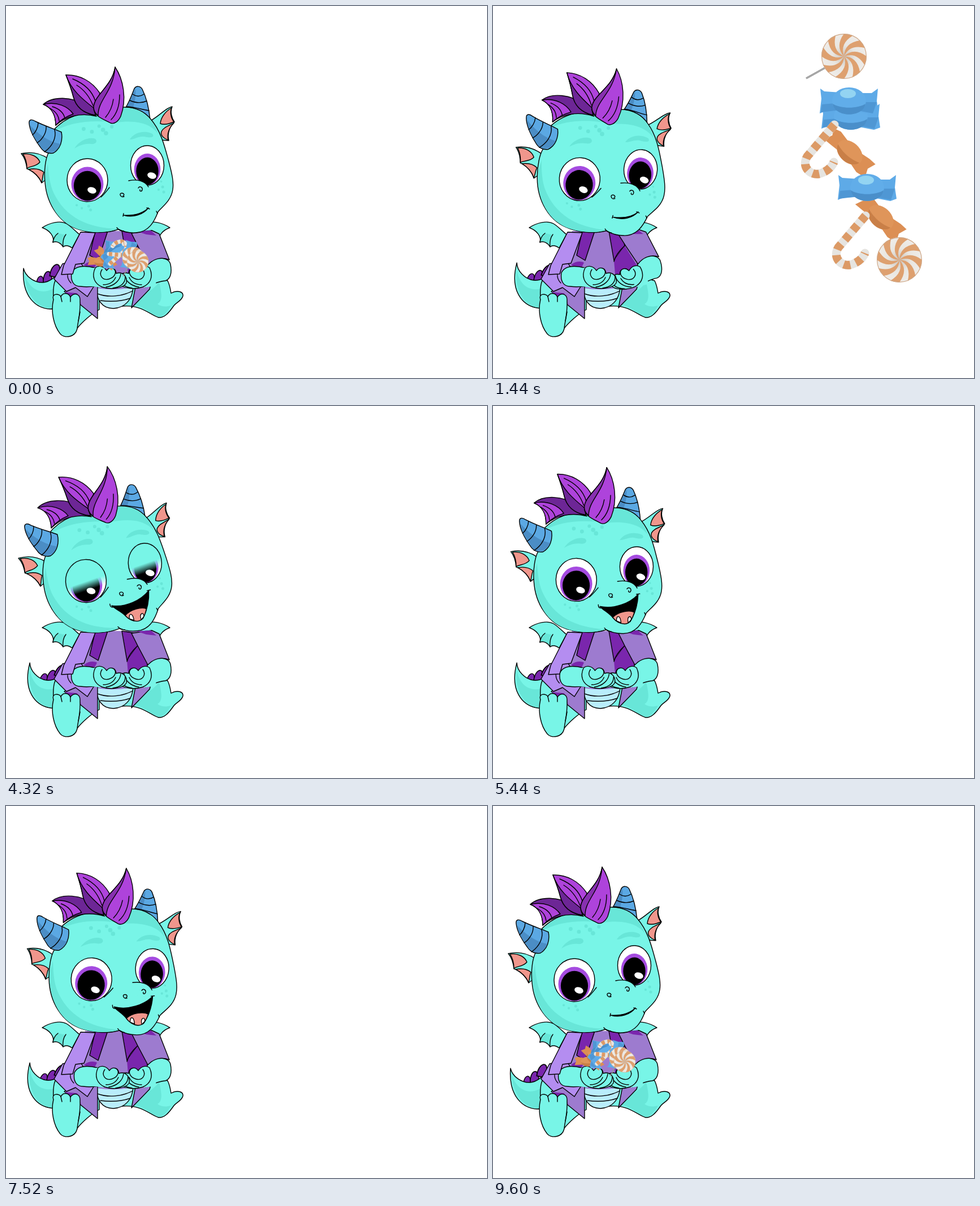
Animation, 851 px wide and 658 px high, one loop 9760 ms. Source, as an HTML page:

```html
<!DOCTYPE html>
<html lang="en">
<head>
<meta charset="utf-8">
<title>Little dragon</title>
<style>
html, body { margin: 0; width: 100%; height: 100%; overflow: hidden; background: #fff; }
svg { display: block; width: 851px; height: 658px; }
#dragon { stroke: #000; stroke-width: 1.4; stroke-linejoin: round; stroke-linecap: round; }
.skin { fill: #78f5e7; }
.shade { fill: #68e6d8; stroke: none; }
.line { fill: none; }
.bare { stroke: none; }
.horn { fill: #5ba8e3; }
.hornDark { fill: #4b8dc5; stroke: none; }
.pink { fill: #f0968c; }
.hair { fill: #ae43db; }
.hairMid { fill: #8730b0; }
.hairDark { fill: #6d2696; }
.vest { fill: #9d7bcf; }
.vestLight { fill: #b48df0; }
.vestDark { fill: #7a26ad; }
.belly { fill: #b9edfb; }
.white { fill: #fff; }
</style>
</head>
<body>
<svg viewBox="0 0 851 658">
<defs>
  <linearGradient id="lidFade" x1="0" y1="0" x2="0" y2="1">
    <stop offset=".84" stop-color="#78f5e7"/>
    <stop offset="1" stop-color="#78f5e7" stop-opacity="0"/>
  </linearGradient>
  <radialGradient id="sugar">
    <stop stop-color="#c9c2ba"/>
    <stop offset=".5" stop-color="#e9e6e1"/>
    <stop offset="1" stop-color="#efece8"/>
  </radialGradient>
  <g id="lolly">
    <circle r="40" fill="url(#sugar)"/>
    <g id="swirl" fill="#dea06f"></g>
    <circle r="39.4" fill="none" stroke="#cfa888" stroke-width="1.2"/>
  </g>
  <g id="stickLolly">
    <path d="M-33 20L-67 39" stroke="#777" stroke-width="3"/>
    <path d="M-33 20L-67 39" stroke="#ddd"/>
    <use href="#lolly"/>
  </g>
  <g id="blue">
    <path d="M0-14L-44-17L-51-22L-49-4L-52 22L-42 18L0 16L41 24L52 20L49 0L51-22L40-14Z" fill="#5eaae7"/>
    <path d="M0 2L-48 6L-50 20L0 14L42 22L49 2Z" fill="#4f97d4"/>
    <ellipse rx="30" ry="24" fill="#61ade9"/>
    <path d="M-29 5C-15 14 15 14 29 5C25 30-25 30-29 5Z" fill="#4a8fca"/>
    <ellipse cx="-2" cy="-13" rx="14" ry="8" fill="#93d4f2"/>
  </g>
  <g id="orange">
    <path d="M0-10L-36-17L-50-13L-43-2L-49 13L-31 12L0 10L32 18L50 15L43 0L48-15L34-15Z" fill="#dc8f54"/>
    <ellipse rx="26" ry="18" fill="#df955a"/>
    <path d="M-25 3C-8 9 10 8 25 2C21 22-19 23-25 3Z" fill="#c97f47"/>
  </g>
  <g id="cane" fill="none" stroke-width="15">
    <path id="hook" d="M28-48L-20 8C-32 28-12 44 4 38C16 34 24 26 27 18" stroke="#e6e4e0" stroke-linecap="round"/>
    <path d="M28-48L-20 8C-32 28-12 44 4 38C16 34 24 26 27 18" stroke="#dc9a66" stroke-dasharray="12 10"/>
  </g>
  <path id="spike" d="M-6 9C-7-4-1-12 4-8C8-3 7 4 6 9Z"/>
  <g id="wing">
    <path class="skin" d="M64 392C78 383 96 379 107 385C117 391 124 400 130 404L117 428C110 423 105 423 101 426C98 420 90 415 83 418C86 408 78 397 64 392Z"/>
    <path class="shade" d="M84 416C85 409 88 405 93 402L105 405C101 412 101 418 101 424C97 418 91 415 84 416Z"/>
    <path class="line" d="M83 418C84 410 88 405 92 402M101 426C100 416 102 409 106 404"/>
  </g>
  <g id="hand">
    <path class="skin bare" d="M150 466L158 462L168 498L146 495Z"/>
    <path class="skin" d="M158 463C151 478 156 491 170 497C184 502 207 500 213 490C215 478 206 469 195 473C194 463 184 460 178 468C172 459 163 459 158 463"/>
    <path class="line" d="M170 466C163 476 171 486 182 483C192 480 196 472 192 466M203 474C202 485 192 495 177 497M211 479C211 490 203 497 189 499M194 480C190 489 183 493 172 493"/>
  </g>
</defs>

<g id="dragon">
  <g id="tail">
    <g class="vestDark">
      <use href="#spike" x="60" y="487"/>
      <use href="#spike" transform="translate(73 480) scale(1.15)"/>
      <use href="#spike" transform="translate(87 468) scale(1.25) rotate(12)"/>
    </g>
    <path class="skin" d="M31 464C34 478 50 490 66 489C80 488 92 474 104 462L104 530C95 534 85 536 78 536C55 535 27 516 31 464Z"/>
    <path class="shade" d="M33 476C42 500 60 512 84 500L90 534C60 540 36 515 33 476Z"/>
  </g>
  <use id="wingL" href="#wing"/>
  <g id="wingR"><use href="#wing" transform="translate(354 0) scale(-1 1)"/></g>
  <g id="legR">
    <path class="skin" d="M205 500C240 480 270 480 286 486C290 494 291 502 292 508C303 502 314 505 313 513C311 521 302 524 297 530C288 543 280 552 270 551C254 546 240 528 205 531Z"/>
    <path class="shade" d="M230 515C250 510 262 500 271 488C276 510 277 522 268 527C276 533 284 532 292 530C284 543 278 550 270 550C255 545 243 530 225 529Z"/>
  </g>

  <path class="skin" d="M87 486C82 498 84 510 84 520L126 570C134 560 150 545 165 537L165 500Z"/>
  <path class="belly" d="M160 498C160 520 170 535 190 535C210 534 224 520 225 496Z"/>
  <path class="line" d="M162 509C180 516 205 514 224 504M167 521C182 523 202 523 220 517"/>
  <path class="vest bare" d="M140 398L262 398L258 488C220 503 180 504 150 497L112 470Z"/>
  <path class="vestDark" d="M158 398L180 398L163 450L148 441ZM205 398L229 402L233 424L214 450Z"/>
  <path class="vestDark bare" d="M233 424L254 458L250 474L216 474L214 450Z"/>
  <path class="line" d="M233 424C222 434 216 443 214 452"/>
  <path class="vest" d="M229 497L258 487L254 501L222 534Z"/>
  <path class="vest" d="M103 505L130 490L162 496L162 553Z"/>
  <path class="vestDark bare" d="M104 506L126 508L133 528L118 516Z"/>
  <path class="vestLight" d="M100 456L85 483L107 505L123 498L144 514L156 495L130 450Z"/>
  <path class="vestDark bare" d="M138 458C146 451 156 451 161 454L154 468Z"/>
  <path class="skin" d="M84 519C80 508 94 508 97 514C101 506 111 507 114 515C119 506 132 508 131 522C132 545 127 558 126 571C122 587 103 588 96 580C84 565 79 540 84 519Z"/>
  <path class="line" d="M97 514L99 523M114 515L114 523M131 541L128 557"/>

  <g id="armR">
    <path class="skin" d="M250 455C263 442 288 443 291 457C294 472 291 483 282 486C269 487 262 491 246 497L250 467Z"/>
    <use href="#hand" transform="translate(412 0) scale(-1 1)"/>
    <path class="vest" d="M222 402L258 397L271 403L289 449C275 443 261 447 251 458L233 424Z"/>
    <path class="vestDark bare" d="M230 398L256 397L266 406L248 404Z"/>
  </g>
  <g id="armL">
    <path class="skin" d="M116 472C114 486 119 496 132 496C145 498 155 496 162 495L157 463C140 459 122 459 116 472Z"/>
    <use href="#hand"/>
    <path class="line" d="M115 490C108 483 108 475 110 470"/>
  </g>
  <path class="vestLight" d="M132 400L158 401L138 455L123 457L118 474L98 475L102 459Z"/>

  <g id="head">
    <path class="skin" d="M27 261C33 268 36 278 37 288C45 290 58 300 63 313C68 308 72 307 79 307L75 270C60 260 45 257 27 261Z"/>
    <path class="pink" d="M30 262C44 260 56 266 60 276C54 284 44 283 37 287C37 277 34 268 30 262ZM40 289C50 287 60 288 67 294C64 302 65 307 63 312C58 301 50 294 40 289Z"/>
    <path class="skin" d="M252 205C272 195 282 180 294 178C290 187 293 198 298 205C290 213 285 225 288 238L272 237Z"/>
    <path class="pink" d="M293 180C283 186 274 196 273 208C280 211 290 208 297 205C291 197 290 187 293 180ZM297 207C288 212 278 215 275 222C273 228 278 234 287 237C284 226 289 215 297 207Z"/>
    <path class="horn" d="M211 181C220 166 224 153 227 146C231 140 238 142 241 147C249 163 253 180 255 202C243 188 230 180 211 181Z"/>
    <path class="hornDark" d="M213 180C221 166 226 152 229 145C230 160 228 171 224 181Z"/>
    <path class="line" d="M224 156C231 161 238 160 244 156M219 167C230 172 240 172 249 168M214 178C230 179 243 184 253 185"/>
    <path class="skin" d="M82 222C110 188 150 187 185 182C215 175 240 180 256 200C275 222 281 250 288 275C294 298 297 312 295 325C292 345 276 355 269 364C263 380 253 400 230 401C215 402 205 398 199 395C180 402 155 402 135 397C95 388 72 350 69 312C67 290 70 270 75 260C73 245 76 230 82 222Z"/>
    <path class="shade" d="M70 300C70 350 95 388 135 397C155 402 180 401 198 394C145 393 105 374 84 330C79 318 76 305 74 280Z"/>
    <path class="shade" d="M84 222C112 189 150 189 185 183C215 176 238 181 254 200C262 208 266 218 269 226C254 205 225 202 195 206C150 201 115 205 84 222Z"/>
    <path class="horn" d="M41 208C40 200 46 200 52 204C70 213 88 218 98 223C101 238 96 253 84 260C75 262 66 258 61 250C50 235 42 220 41 208Z"/>
    <path class="hornDark" d="M43 211C55 225 75 240 96 244C92 258 75 265 63 251C52 237 44 224 43 211Z"/>
    <path class="line" d="M57 206C57 215 52 224 47 228M71 213C72 226 62 238 55 242M86 219C90 235 80 250 68 258"/>

    <path class="hairDark" d="M66 174C82 159 118 160 138 175L160 195C130 188 105 196 88 211C88 195 82 180 66 174Z"/>
    <path class="hair" d="M66 174C90 168 110 178 119 191C105 196 95 203 88 211C88 195 82 180 66 174Z"/>
    <path class="line" d="M82 178C95 182 102 190 104 198M78 181C90 188 93 195 94 203"/>
    <path class="hair" d="M106 122C130 121 152 133 166 154L158 194C140 190 124 180 119 160C115 145 110 132 106 122Z"/>
    <path class="hairDark" d="M106 122C115 148 134 164 156 181L158 193C138 190 124 180 119 160C115 145 110 132 106 122Z"/>
    <path class="line" d="M118 129C140 138 153 152 158 168M125 140C138 148 148 161 154 176"/>
    <path class="hair" d="M193 108C208 130 214 165 203 195C198 206 190 209 185 207C172 200 155 195 155 180C155 158 188 142 193 108Z"/>
    <path class="hairMid" d="M193 108C188 142 155 158 155 180C156 188 159 190 163 194C162 166 190 152 193 108Z"/>
    <path class="line" d="M201 157C201 177 196 191 186 201M190 165C188 180 182 190 176 197"/>

    <g class="shade">
      <path d="M121 252C130 237 148 231 158 235C163 240 158 245 150 244C138 243 130 247 121 252Z"/>
      <path d="M219 236C226 224 244 219 259 226C264 232 256 234 244 231C234 230 228 236 219 236Z"/>
      <g id="freckles"></g>
    </g>
    <g id="eyes"></g>
    <path class="skin bare" d="M217 311C230 305 246 308 252 320L240 334L216 330Z"/>
    <path class="line" d="M217 309C232 306 246 309 252 320M168 338C174 333 179 326 183 321M209 337C203 340 199 331 205 331C209 331 210 335 207 336M234 322C236 318 242 320 241 325C240 329 236 328 237 325M266 363L268 367M196 392C199 396 204 398 208 398"/>
    <path id="closed" d="M208 370C225 375 243 369 252 357C242 367 226 371 208 370ZM208 367L207 372M249 357L254 359"/>
    <g id="open">
      <path d="M187 354C212 359 240 347 254 331C254 350 249 366 241 380C231 387 218 382 210 373C202 364 193 361 187 354Z"/>
      <path class="pink" d="M210 373C220 362 240 359 248 363C245 375 240 384 231 384C222 384 215 379 210 373Z"/>
      <path class="white" d="M217 379C216 369 223 367 225 382ZM238 382C234 370 243 367 243 376Z"/>
      <path class="line" d="M184 351C184 355 186 357 189 357M251 331L257 330"/>
    </g>
  </g>
</g>
<g id="candies"></g>
</svg>
<script>
const LOOP = 9760, STEP = 160;
const $ = id => document.getElementById(id);
const mix = (a, b, k) => a + (b - a) * k;
const part = (t, a, b) => Math.min(1, Math.max(0, (t - a) / (b - a)));
const ramp = (t, a, b) => (1 - Math.cos(Math.PI * part(t, a, b))) / 2;
const pulse = (t, a, b) => Math.sin(Math.PI * part(t, a, b));

const move = (el, x, y, r = 0, px = 0, py = 0) =>
  el.setAttribute("transform", `translate(${x} ${y}) rotate(${r} ${px} ${py})`);
const turn = (id, r, px, py) => move($(id), 0, 0, r, px, py);

// Curved stripes that fan out from the middle of a lollipop
function swirl(blades, radius) {
  const spot = (a, r) => `${r * Math.cos(a)} ${r * Math.sin(a)}`;
  const sector = 2 * Math.PI / blades;
  let out = "";
  for (let i = 0; i < blades; i++) {
    const a = i * sector, b = a + sector * .52, bend = .75;
    out += `<path d="M0 0Q${spot(a - bend, radius * .6)} ${spot(a, radius)}A${radius} ${radius} 0 0 1 ${spot(b, radius)}Q${spot(b - bend, radius * .6)} 0 0Z"/>`;
  }
  return out;
}
$("swirl").innerHTML = swirl(8, 40);

function dots(count, x, y, rx, ry, size) {
  let out = "";
  for (let i = 0; i < count; i++) {
    const a = i * 2.4, far = Math.sqrt((i + .5) / count);
    out += `<circle cx="${x + rx * far * Math.cos(a)}" cy="${y + ry * far * Math.sin(a)}" r="${size - i % 3 * .4}"/>`;
  }
  return out;
}
$("freckles").innerHTML = dots(6, 163, 219, 30, 10, 3.8) + dots(5, 141, 354, 17, 10, 2.5) + dots(4, 274, 320, 9, 12, 2.5);

function eye(id, x, y, rx, ry) {
  const oval = `<ellipse cx="${x}" cy="${y}" rx="${rx}" ry="${ry}"`;
  return `<clipPath id="${id}">${oval}/></clipPath>${oval} class="white bare"/>
    <g clip-path="url(#${id})" stroke="none">
      <ellipse cx="${x}" cy="${y + 7}" rx="${rx * .79}" ry="${ry * .8}" fill="#a54be0"/>
      <ellipse cx="${x}" cy="${y + 10}" rx="${rx * .67}" ry="${ry * .69}"/>
      <ellipse class="glint white" data-x="${x + 8}" data-y="${y + 18}"/>
      <g transform="translate(${x} ${y}) rotate(-16)"><rect class="lid" x="-60" y="-135" width="120" height="100" fill="url(#lidFade)"/></g>
    </g>${oval} class="line"/>`;
}
$("eyes").innerHTML = eye("eyeL", 144, 308, 36, 38) + eye("eyeR", 250, 282, 29.5, 35);
const glints = document.querySelectorAll(".glint"), lids = document.querySelectorAll(".lid");

// Each sweet with its place in mid air, listed from left to right in the hands
const sweets = [
  ["orange", 631, 259], ["orange", 686, 374], ["blue", 633, 195],
  ["blue", 662, 321], ["cane", 576, 258], ["cane", 631, 419],
  ["blue", 630, 168], ["stickLolly", 621, 89], ["lolly", 719, 449]
].map(([kind, x, y], i, all) => {
  const el = document.createElementNS("http://www.w3.org/2000/svg", "use");
  el.setAttribute("href", "#" + kind);
  $("candies").append(el);
  const u = i / (all.length - 1);
  const slot = all.filter(other => other[2] < y).length;
  return {
    el,
    hand: { x: mix(168, 233, u), y: 452 - 17 * Math.sin(Math.PI * u), r: i * 47 % 360 },
    air: { x, y, r: kind == "orange" ? 42 : 0 },
    far: { x: 782 + 7 * Math.sin(slot * 2), y: 96 + slot * 65.5, r: 60 + i * 25 }
  };
});

const headTurn = t =>
  t < 1440 ? 4.7 * ramp(t, 0, 1440) :
  t < 6560 ? .6 + 4.1 * Math.cos(2 * Math.PI * (t - 1440) / 5120) :
  4.7 * (1 - ramp(t, 6560, 9600));

function drawDragon(t) {
  const breath = pulse(t, 2080, 3360);
  const flap = 11 * (breath + pulse(t, 7680, 8960));
  const reach = pulse(t, 160, 2720);

  move($("head"), 4 * pulse(t, 2200, 5600), -3 * breath, headTurn(t), 169, 421);
  turn("tail", 10.5 * (ramp(t, 0, 1440) - .5 * pulse(t, 1440, 4000) - ramp(t, 8320, 9600)), 90, 520);
  turn("wingL", -flap, 118, 412);
  turn("wingR", flap, 260, 392);
  turn("legR", -5 * breath - 12 * pulse(t, 5760, 7360), 222, 545);
  turn("armR", -6 * reach, 240, 405);
  move($("armL"), 5 * (reach + pulse(t, 4640, 9600)), 0);

  const laughing = t >= 2080 && t < 8960;
  $("open").style.display = laughing ? "" : "none";
  $("closed").style.display = laughing ? "none" : "";

  const wide = pulse(t, 1920, 3520);
  for (const g of glints) {
    g.setAttribute("rx", mix(8, 9, wide));
    g.setAttribute("ry", mix(5.5, 11, wide));
    move(g, +g.dataset.x, g.dataset.y - 7 * wide, mix(18, -25, wide));
  }
  for (const l of lids) move(l, 0, 88 * pulse(t, 4160, 4960));
}

function drawCandies(t) {
  const back = t >= 8000;
  const fly = back ? 0 : part(t, 160, 1440);
  const leave = back ? 0 : part(t, 1440, 2720);
  const settle = 1 - (1 - leave) ** 2;
  const size = mix(.48, 1, fly) * (1 - .91 * leave ** 2);
  const drift = back ? 6 * (1 - part(t, 8320, 9600)) : 0;

  $("candies").style.display = back || t < 2880 ? "" : "none";
  $("candies").style.opacity = back ? part(t, 8000, 8640) : 1;
  for (const { el, hand, air, far } of sweets) {
    const [x, y, r] = ["x", "y", "r"].map(p => mix(mix(hand[p], air[p], fly), far[p], settle));
    el.setAttribute("transform", `translate(${x + drift} ${y}) rotate(${r}) scale(${size})`);
  }
}

const start = performance.now();
function tick() {
  const t = Math.floor((performance.now() - start) % LOOP / STEP) * STEP;
  drawDragon(t);
  drawCandies(t);
  requestAnimationFrame(tick);
}
tick();
</script>
</body>
</html>
```
